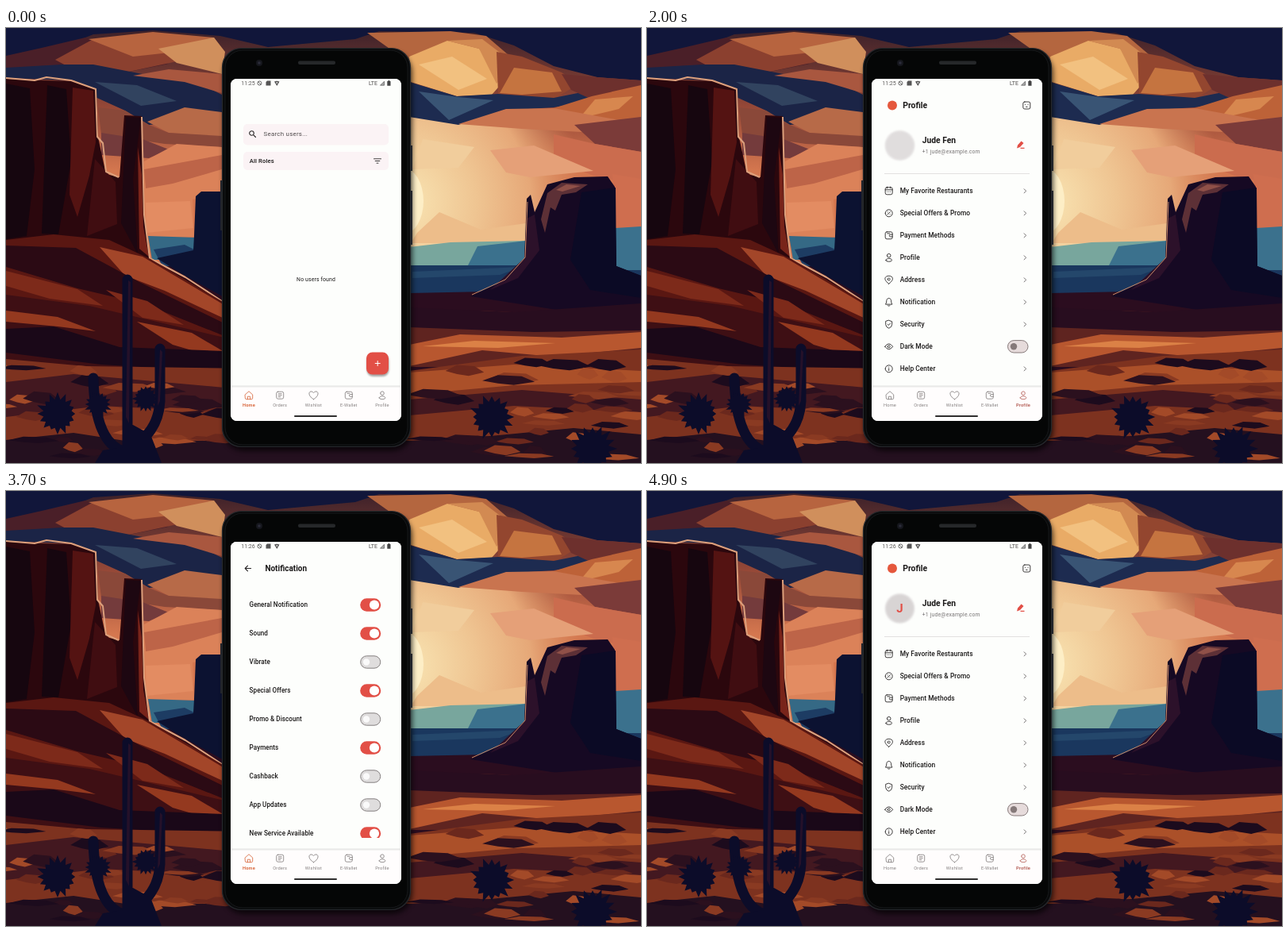
Animation, 800 px wide and 548 px high, one loop 5200 ms. Source, as an HTML page:

```html
<!DOCTYPE html>
<html lang="en">
<head>
<meta charset="utf-8">
<title>Mobile app demo</title>
<style>
  html, body { margin: 0; width: 100%; height: 100%; overflow: hidden; background: #160b1f; }
  svg { display: block; width: 800px; height: 548px; }
  text { font-family: Roboto, sans-serif; fill: #1c1a1a; }
  .icon { fill: none; stroke: #2a2828; stroke-width: .9; stroke-linecap: round; stroke-linejoin: round; }
  #nav .icon { stroke: #858080; stroke-width: .85; }
  #nav text { fill: #858080; }
  #nav .on .icon { stroke: var(--tint); }
  #nav .on text { fill: var(--tint); font-weight: 700; }
</style>
</head>
<body>
<svg viewBox="0 0 800 548">
  <defs>
    <linearGradient id="sky" x2="0" y2="1">
      <stop offset="0" stop-color="#3a2029"/><stop offset=".35" stop-color="#9a4a38"/>
      <stop offset=".6" stop-color="#d4774f"/><stop offset="1" stop-color="#d9764f"/>
    </linearGradient>
    <radialGradient id="glow" gradientUnits="userSpaceOnUse" cx="500" cy="220" r="230">
      <stop offset="0" stop-color="#fff3cf"/><stop offset=".12" stop-color="#f6dcaa"/>
      <stop offset=".4" stop-color="#efc592"/><stop offset=".7" stop-color="#e6a878"/>
      <stop offset="1" stop-color="#d88c60" stop-opacity="0"/>
    </radialGradient>
    <clipPath id="screen"><rect x="283" y="64" width="215" height="431" rx="8"/></clipPath>
    <clipPath id="list"><rect x="283" y="119" width="215" height="318"/></clipPath>
    <filter id="soft" x="-30%" y="-30%" width="160%" height="160%"><feGaussianBlur stdDeviation="3"/></filter>
    <filter id="blur"><feGaussianBlur stdDeviation="1"/></filter>
  </defs>

  <g id="sky-art">
    <path fill="url(#sky)" d="M0 0H800V300H0Z"/>
    <path fill="url(#glow)" d="M500 95L800 120V300H500Z"/>
    <path fill="#11163a" d="M0 0H800V66L745 62 690 48 640 22 590 6 470 4 440 14 330 24 270 10 185 3 110 8 85 18 40 30 0 36Z"/>
    <path fill="#4a1f28" d="M0 35L45 25 100 12 150 30 205 45 140 58 90 62 0 62Z"/>
    <path fill="#8b402f" d="M62 40L110 14 190 16 225 40 150 56 92 56Z"/>
    <path fill="#b7643f" d="M104 14L185 5 262 12 272 26 215 30 160 36Z"/>
    <path fill="#d08f5c" d="M192 26L262 12 276 30 272 58 215 44Z"/>
    <path fill="#1b2446" d="M0 50L70 46 110 46 172 58 232 64 272 84V124L225 119 180 122 150 104 108 85 86 66 0 63Z"/>
    <path fill="#31435f" d="M112 68L165 72 215 92 170 98Z"/>
    <path fill="#a9573f" d="M160 60L205 52 272 58V82L225 68Z"/>
    <path fill="#b76a48" d="M178 118L225 100 272 106V138L205 132Z"/>
    <path fill="#8a4839" d="M116 100L150 104 180 122 205 132 272 136V150L200 146 120 134Z"/>
    <path fill="#743b3c" d="M120 132L172 140 205 153 180 164 120 160Z"/>
    <path fill="#db8259" d="M174 168L215 146 272 150V208L235 216 237 263 176 264Z"/>
    <path fill="#bd6448" d="M174 178L272 160V178L210 196 176 202Z"/>
    <path fill="#e38c62" d="M176 220L232 218 236 252 177 258Z"/>
    <path fill="#356985" d="M179 262L240 264V292H184Z"/>
    <path fill="#1d3c63" d="M186 279L225 273 275 298V325H210Z"/>

    <path fill="#b4663f" d="M455 6L560 4 605 10 640 40 600 32 545 30 510 45Z"/>
    <path fill="#e9ab66" d="M508 36L556 16 596 26 628 66 612 84 568 86 510 68Z"/>
    <path fill="#d28a52" d="M556 16L600 14 642 46 618 70 596 26Z"/>
    <path fill="#f2c180" d="M520 46L562 36 606 64 570 78Z"/>
    <path fill="#93462f" d="M618 30L650 36 700 56 722 70 690 90 620 83Z"/>
    <path fill="#c57440" d="M640 50L688 56 700 80 650 84 622 82Z"/>
    <path fill="#1d2b50" d="M508 68L568 86 620 83 690 88 730 80 738 92 690 100 626 104 570 122 508 112Z"/>
    <path fill="#395474" d="M520 80L570 87 614 91 558 116Z"/>
    <path fill="#6d302d" d="M700 58L745 62 800 66V86L738 90 712 78Z"/>
    <path fill="#bd6238" d="M738 86L800 72V122L715 119 690 101Z"/>
    <path fill="#d7874f" d="M742 90L790 86 772 102 722 114Z"/>
    <path fill="#c9744f" d="M570 121L630 102 690 101 800 121V145L725 131 650 127Z"/>
    <path fill="#7b3b39" d="M716 122L800 112V156L742 146Z"/>
    <path fill="#cb6c4e" d="M690 134L742 146 800 156V200L740 186 690 166Z"/>
    <path fill="#e5a078" d="M610 154L665 148 740 180 660 188 630 182Z"/>
    <path fill="#cf6e4f" d="M764 184L800 190V254H769Z"/>
    <path fill="#f1cd9c" d="M525 140L590 150 570 176 512 178Z"/>
    <path fill="#edbd8a" d="M518 258L546 232 598 254 655 246V271H510Z"/>
    <ellipse cx="500" cy="218" rx="26" ry="42" fill="#fdeec6"/>
    <path fill="#78a69d" d="M508 276L560 270 655 268V300H508Z"/>
    <path fill="#3b718d" d="M594 275L656 268V299H582Z"/>
    <path fill="#1a375e" d="M508 299H800V342H508Z"/>
    <path fill="#24476b" d="M512 307L650 301 622 311 512 315Z"/>
    <path fill="#3b718d" d="M768 252L800 250V305H768Z"/>
  </g>

  <g id="land">
    <path fill="#2b0d1f" d="M508 334L800 328V548H0V300H275L508 350Z"/>
    <path fill="#0c1231" d="M237 262L239 212 246 206H276V340L222 310 190 290 236 280Z"/>
    <path fill="#160923" d="M656 215L661 210 666 232 682 197 716 188 758 187 767 200 769 300 800 312V362L700 356 585 338 628 318 653 290Z"/>
    <path fill="#0b0a25" d="M725 207L768 201 769 300 800 312V340L736 330 711 292Z"/>
    <path fill="#5d3036" d="M682 208L700 195 733 197 718 207 700 210 692 230 686 226 679 258 674 241Z"/>
    <path fill="#8f5048" d="M693 204L706 197 724 199 701 206Z"/>
    <path fill="#2c112a" d="M656 240L666 235 672 280 645 315 610 330 653 290Z"/>
    <path fill="none" stroke="#c98a68" d="M657 219L654 289 629 317 587 336"/>

    <path fill="#2b070d" d="M0 64L40 66 86 67 114 78 116 138 126 184 143 188 149 110 171 111 174 235 181 289 278 347V420H0Z"/>
    <path fill="#16060f" d="M0 70L30 76 36 178 26 262 0 266ZM52 72L76 77 82 168 66 260 45 259Z"/>
    <path fill="#541312" d="M84 75L110 79 113 144 105 186 90 238 80 210Z"/>
    <path fill="#1d0711" d="M151 112L170 113 160 190 166 285 145 246Z"/>
    <path fill="#400d11" d="M112 165L138 194 140 247 102 262Z"/>
    <path fill="#78241a" d="M166 150L171 185 173 250 180 288 168 278Z"/>
    <path fill="none" stroke="#dda07c" stroke-width="2" stroke-linejoin="round" d="M0 63L36 66 51 62 82 66 113 77 115 137 122 145 126 181 142 188M171 112L174 235 181 290 226 314 272 344"/>
    <path fill="#5a1712" d="M0 267L60 260 130 267 182 291 275 346V409L170 373 60 352 0 356Z"/>
    <path fill="#a34629" d="M118 276L172 288 275 349V366L200 331 150 312Z"/>
    <path fill="#2b0a14" d="M0 274L88 277 168 320 275 372V388L175 348 90 328 0 301Z"/>
    <path fill="#7d2a1a" d="M0 306L90 329 122 350 55 341 0 325ZM126 330L178 344 224 374 172 365Z"/>
    <path fill="#3e0f14" d="M0 336L105 350 275 390V450L0 444Z"/>
    <path fill="#94391f" d="M0 356L65 364 113 382 65 376 0 370ZM165 370L234 384 275 408V418L210 399Z"/>
    <path fill="#1a0818" d="M0 379L60 376 143 402 275 407V433L120 424 0 409Z"/>

    <path fill="#5f2420" d="M508 362L600 356 800 367V427H508Z"/>
    <path fill="#b8572f" d="M508 399L572 386 700 390 800 383V403L690 414 600 406 508 426Z"/>
    <path fill="#db8146" d="M525 401L590 394 692 397 620 403Z"/>
    <path fill="#280d1f" d="M508 352L640 358 800 347V381L665 383 508 377Z"/>
    <path fill="#7d321f" d="M0 417L100 426 508 432 650 413 800 405V548H0Z"/>
    <path fill="#ab5029" d="M508 434L640 424 800 432V446L640 450 508 462Z"/>
    <path fill="#431820" d="M0 446L85 436 275 453V484L120 476 0 490ZM508 468L650 456 800 468V484L640 476 508 488Z"/>
    <path fill="#24101f" d="M0 519L85 510 150 520 508 520 610 514 715 504 800 512V548H0Z"/>
    <g id="streaks"></g>
    <g id="plants" fill="#0c0c29">
      <path fill="none" stroke="#0c0c29" stroke-width="13" stroke-linecap="round" d="M153 317V548M194 404V470Q192 505 166 522M110 441Q112 524 150 534"/>
      <path d="M147 500H160L182 512 196 548H112L122 532 147 528Z"/>
      <path fill="#251129" d="M154 318L157 320 155 498 151 490ZM194 405L197 408 194 470 191 476Z"/>
    </g>
  </g>

  <g id="phone">
    <rect x="274" y="30" width="238" height="503" rx="26" fill="#000" opacity=".65" filter="url(#soft)"/>
    <path fill="#22242a" d="M508 148h4v32h-4zM508 205h4v68h-4zM270 192h4v63h-4z"/>
    <rect x="272.5" y="25.5" width="237" height="502" rx="24" fill="#090a0b" stroke="#26292d" stroke-width="1.2"/>
    <rect x="276" y="28" width="230" height="497" rx="22" fill="#050606" stroke="#17191b"/>
    <circle cx="319" cy="44" r="4" fill="#16171d"/><circle cx="319" cy="44" r="1.8" fill="#2b2c3a"/>
    <rect x="368" y="41.5" width="47" height="4.5" rx="2" fill="#26282a"/>
    <g clip-path="url(#screen)">
      <path fill="#fdfefc" d="M283 64h215v431H283z"/>
      <g id="home"></g><g id="profile"></g><g id="notice"></g>
      <path fill="#000" opacity=".1" filter="url(#blur)" d="M283 450.5h215v3H283z"/>
      <path fill="#fffdfd" d="M283 452.5h215v43H283z"/>
      <g id="nav"></g>
      <rect x="363" y="488" width="54" height="2" rx="1" fill="#302f2f"/>
      <g id="status"></g>
    </g>
  </g>
</svg>

<script>
const RED = '#e24f46', LOOP = 5200;
const $ = id => document.getElementById(id);

const BOX = 'M-2.5-4.5h5a2 2 0 0 1 2 2v5a2 2 0 0 1-2 2h-5a2 2 0 0 1-2-2v-5a2 2 0 0 1 2-2Z';
const RING = 'M-4.5 0a4.5 4.5 0 1 1 9 0a4.5 4.5 0 1 1-9 0';
const ICONS = {
  home: 'M-4.7-.8L0-5 4.7-.8V3.5Q4.7 5 3.2 5H-3.2Q-4.7 5-4.7 3.5ZM-1.6 5V1.5H1.6V5',
  orders: BOX + 'M-2-2H2M-2 0H2M-2 2H.5',
  heart: 'M0 5C-10-1-4.5-8 0-3.2C4.5-8 10-1 0 5Z',
  wallet: BOX + 'M4.5-1.2H2a1.4 1.4 0 0 0 0 2.8H4.5M-2-2.4H1',
  user: 'M-2.3-2.6a2.3 2.3 0 1 1 4.6 0a2.3 2.3 0 1 1-4.6 0M-3.8 3.2C-3.8.4 3.8.4 3.8 3.2Q3.8 5 0 5T-3.8 3.2Z',
  calendar: BOX + 'M-4.5-1.5H4.5M-2-5.2V-3.5M2-5.2V-3.5M-2 1H-1.9M0 1H.1M2 1H2.1',
  offer: RING + 'M-1.7 1.7L1.7-1.7M-1.6-1.5H-1.4M1.4 1.5H1.6',
  pin: 'M0 5C-9-2-3.5-5 0-5S9-2 0 5ZM-1.5-.8a1.5 1.5 0 1 1 3 0a1.5 1.5 0 1 1-3 0',
  bell: 'M-4 2.5Q-2.9 1-2.9-1.4C-2.9-6 2.9-6 2.9-1.4Q2.9 1 4 2.5ZM-1.3 4.5Q0 5.5 1.3 4.5',
  shield: 'M0-5L4-3.5V0Q4 3.5 0 5Q-4 3.5-4 0V-3.5ZM-1.6 0L-.4 1.2 1.8-1.2',
  eye: 'M-5 0Q0-7 5 0Q0 7-5 0ZM-1.5 0a1.5 1.5 0 1 1 3 0a1.5 1.5 0 1 1-3 0',
  info: RING + 'M0-.5V2.3M0-2.3V-2.2',
  face: BOX + 'M-1.8-1H-1.7M1.7-1H1.8M-.8 1.8H.8',
  chevron: 'M-1.2-2.5L1.3 0-1.2 2.5',
  back: 'M3.8 0H-3.5M-.3-3.3L-3.6 0-.3 3.3',
  search: 'M-3.8-1a2.8 2.8 0 1 1 5.6 0a2.8 2.8 0 1 1-5.6 0M1.1 1.1L4 4',
  filter: 'M-4.5-2.7H4.5M-2.8 0H2.8M-1 2.7H1'
};

const icon = (name, x, y, extra = '') =>
  `<path class="icon" d="${ICONS[name]}" transform="translate(${x} ${y})" ${extra}/>`;
const text = (s, x, y, size, weight = 400, spacing = 0, extra = '') =>
  `<text x="${x}" y="${y}" font-size="${size}" font-weight="${weight}" letter-spacing="${spacing}" ${extra}>${s}</text>`;
const rect = (x, y, w, h, r, fill, extra = '') =>
  `<rect x="${x}" y="${y}" width="${w}" height="${h}" rx="${r}" fill="${fill}" ${extra}/>`;
const circle = (x, y, r, fill, extra = '') =>
  `<circle cx="${x}" cy="${y}" r="${r}" fill="${fill}" ${extra}/>`;
const sheet = rect(283, 64, 215, 389, 0, '#fdfefc');

function toggle(x, y, on) {
  return on
    ? rect(x - 13, y - 8.2, 26, 16.4, 8.2, RED) + circle(x + 4.8, y, 6.1, '#fff')
    : rect(x - 12.5, y - 7.7, 25, 15.4, 7.7, '#dfdddd', 'stroke="#858080"') + circle(x - 5.2, y, 4.2, '#fafafa');
}

// Scenery: angular ground patches and spiky shrubs
let seed = 11;
const rand = () => (seed = seed * 16807 % 2147483647) / 2147483647;
const tones = ['#a34a28', '#2b101e', '#6b281d', '#1c0b1d', '#8a3a22'];
let streaks = '';
for (let i = 0; i < 70; i++) {
  const x = (i % 2 ? 500 : -25) + rand() * 275, y = 422 + rand() * 122, w = 25 + rand() * 45, h = 3 + rand() * 6;
  streaks += `<path fill="${tones[i % 5]}" d="M${x} ${y}l${w * .3} ${-h} ${w * .45} ${h * .2} ${w * .25} ${h} ${-w * .4} ${h * .6} ${-w * .3} ${-h * .3}Z"/>`;
}
$('streaks').innerHTML = streaks;

function shrub(cx, cy, r) {
  let d = '';
  for (let i = 0; i < 32; i++) {
    const a = i * Math.PI / 16, k = r * (i % 2 ? .72 : .85 + rand() * .28);
    d += `${i ? 'L' : 'M'}${cx + k * Math.cos(a)} ${cy + k * Math.sin(a)}`;
  }
  return `<path d="${d}Z"/>`;
}
$('plants').innerHTML += shrub(65, 486, 25) + shrub(116, 474, 16) + shrub(176, 467, 16)
  + shrub(612, 490, 27) + shrub(739, 530, 28);

// Pages
$('home').innerHTML = sheet
  + rect(299, 121, 183, 26.5, 5, '#fbf3f5') + icon('search', 310.5, 133.5, 'style="stroke-width:1.1"')
  + text('Search users...', 324.5, 136.2, 7.9, 400, .26, 'style="fill:#514c4d"')
  + rect(299, 156, 183, 23, 5, '#fbf3f5') + text('All Roles', 306.7, 170.3, 7.7, 500, .1)
  + icon('filter', 468, 167.5)
  + text('No users found', 390.5, 318.5, 6.9, 400, .13, 'text-anchor="middle"')
  + rect(454.5, 411, 28, 28, 8, '#000', 'opacity=".35" filter="url(#blur)"')
  + rect(454, 408.5, 28, 28, 7.5, RED)
  + '<path d="M464.8 422.5h6.8M468.2 419.1v6.8" stroke="#fff"/>';

const menu = ['calendar/My Favorite Restaurants', 'offer/Special Offers &amp; Promo', 'wallet/Payment Methods',
  'user/Profile', 'pin/Address', 'bell/Notification', 'shield/Security', 'eye/Dark Mode', 'info/Help Center'];
$('profile').innerHTML = sheet
  + circle(309, 97.5, 6, '#e5583d') + text('Profile', 322.3, 101.3, 10.4, 700)
  + icon('face', 478.3, 97.5)
  + circle(318.5, 148, 19, '#e9e7e7', 'filter="url(#blur)"')
  + circle(318.5, 148, 17.5, '#dedbdb', 'id="avatar" filter="url(#blur)"')
  + text('J', 318.5, 153.3, 15, 700, 0, `id="initial" text-anchor="middle" style="fill:${RED}"`)
  + text('Jude Fen', 346.8, 145, 10.3, 700)
  + text('+1 jude@example.com', 346.8, 158.3, 6.8, 400, .2, 'style="fill:#777374"')
  + `<path fill="${RED}" d="M466 151.5L467 147.5 471.5 142.5 474.5 145 470 150ZM470.5 150.7h5v1.2h-5z"/>`
  + rect(299, 183, 183, .8, 0, '#dddada')
  + menu.map((item, i) => {
      const [name, label] = item.split('/'), y = 205.3 + i * 28;
      return icon(name, 304.7, y) + text(label, 318.7, y + 2.9, 8.37, 500, .05)
        + (name === 'eye'
          ? rect(454.5, y - 7.7, 25.5, 15.4, 7.7, '#e6dbdb', 'stroke="#857979"') + circle(462, y, 4.2, '#857979')
          : icon('chevron', 476.3, y, 'style="stroke:#656161"'));
    }).join('');

const options = ['General Notification', 'Sound', 'Vibrate', 'Special Offers', 'Promo &amp; Discount', 'Payments',
  'Cashback', 'App Updates', 'New Service Available', 'New Tips Available'];
const enabled = [0, 1, 3, 5, 8];
$('notice').innerHTML = sheet
  + '<g clip-path="url(#list)"><g id="options">'
  + options.map((label, i) => {
      const y = 143.5 + i * 36;
      return text(label, 306.6, y + 2.8, 8.15, 500, .03) + toggle(459.2, y, enabled.includes(i));
    }).join('')
  + '</g></g>' + rect(290, 79, 201, 32.5, 0, '#f6f1f2', 'id="bar"')
  + icon('back', 304.8, 97.5, 'style="stroke-width:1.1"') + text('Notification', 326.4, 101.2, 10, 700);

const tabs = [['home', 'Home', 306], ['orders', 'Orders', 345.2], ['heart', 'Wishlist', 387.5],
  ['wallet', 'E-Wallet', 431.8], ['user', 'Profile', 474]];
$('nav').innerHTML = tabs.map(([name, label, x], i) =>
  `<g style="--tint:${i ? '#b8665f' : '#d9693f'}">${icon(name, x, 462.7)}${text(label, x, 477, 5.7, 400, .15, 'text-anchor="middle"')}</g>`).join('');

$('status').innerHTML = text('11:25', 296.3, 72.2, 7, 400, 0, 'id="clock" style="fill:#5c5959"')
  + '<path d="M316.9 69.5a2.5 2.5 0 1 1 5 0a2.5 2.5 0 1 1-5 0M317.7 67.8l3.4 3.4" fill="none" stroke="#555" stroke-width=".9"/>'
  + '<path fill="#555" d="M329 66.5h4.5v6H327.5v-4.5zM338 67.5q3-1.5 6.5 0l-3.2 5.5z"/>'
  + circle(341.3, 69, 1, '#ddd')
  + text('LTE', 457, 72.2, 7, 400, 0, 'style="fill:#4d4a4a"')
  + '<path d="M471.5 72.2h5v-5z" fill="#aaa" stroke="#555" stroke-width=".7"/>'
  + '<path fill="#444" d="M480.3 67h1.2v-1h1.8v1h1.2v5.7h-4.2z"/>';

// Motion
const ramp = (t, from, to) => Math.min(1, Math.max(0, (t - from) / (to - from)));
const easeOut = p => 1 - (1 - p) ** 3;
const easeInOut = p => p * p * (3 - 2 * p);

function showPage(id, p) {
  const s = .88 + .12 * easeOut(p);
  $(id).setAttribute('opacity', p);
  $(id).setAttribute('transform', `translate(390.5 265) scale(${s}) translate(-390.5 -265)`);
}

function render(t) {
  showPage('profile', easeInOut(ramp(t, 1650, 1960)));
  showPage('notice', easeInOut(ramp(t, 3120, 3420)) * (1 - easeInOut(ramp(t, 4470, 4830))));

  const scroll = 54.5 * easeInOut(ramp(t, 3840, 4390));
  $('options').setAttribute('transform', `translate(0 ${-scroll})`);
  $('bar').setAttribute('opacity', Math.min(1, scroll / 12));

  const loaded = t >= 2200;
  $('initial').setAttribute('opacity', loaded ? 1 : 0);
  $('avatar').setAttribute('fill', loaded ? '#d8d4d4' : '#e0dddd');
  $('clock').textContent = t < 3200 ? '11:25' : '11:26';

  const active = t < 1700 || (t >= 3200 && t < 4600) ? 0 : 4;
  [...$('nav').children].forEach((tab, i) => tab.classList.toggle('on', i === active));
}

function loop() {
  render(performance.now() % LOOP);
  requestAnimationFrame(loop);
}
loop();
</script>
</body>
</html>
```
